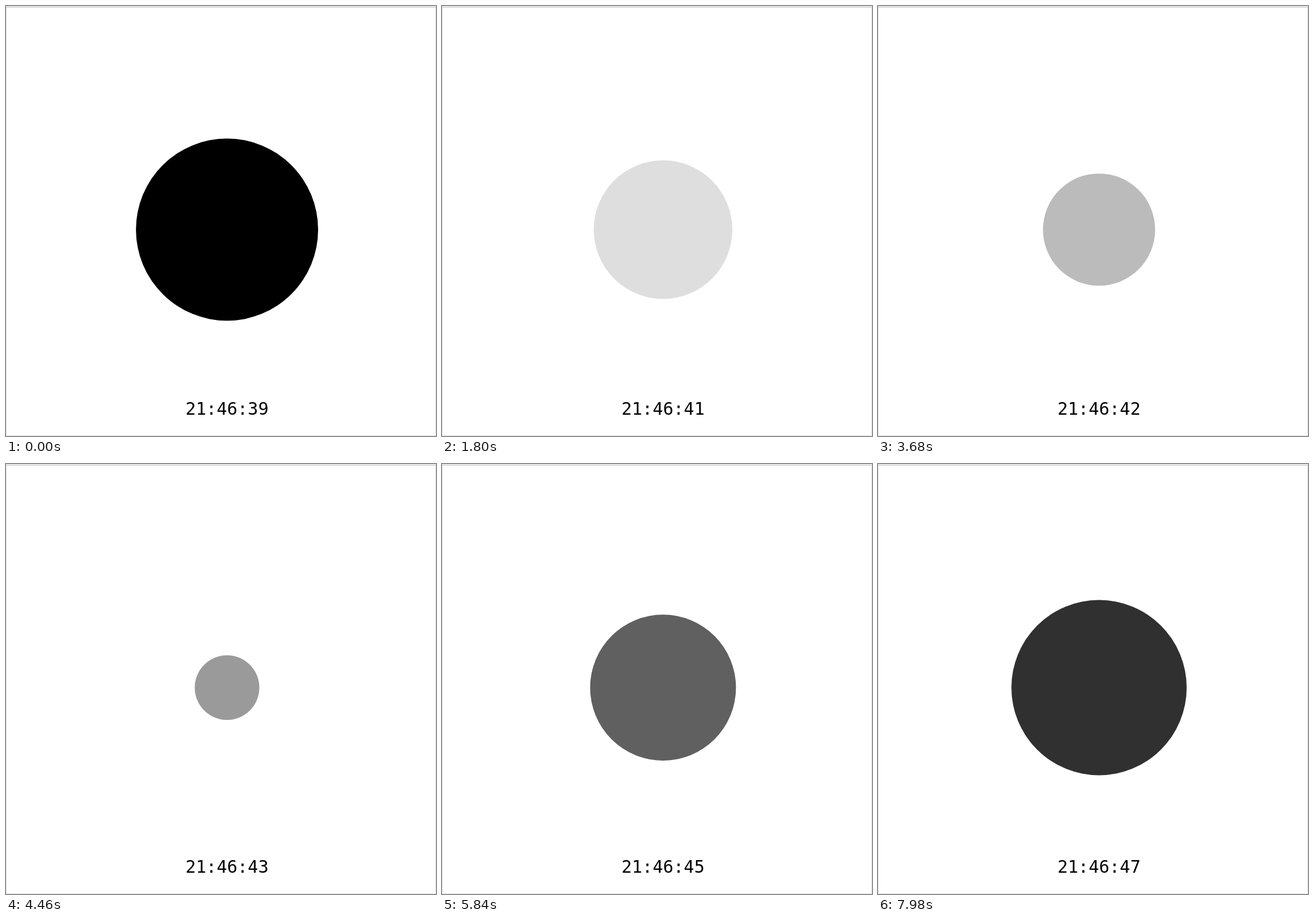
Recreate the animation shown at these times as an HTML page. Size 748x748 px, loop 8 s.

```html
<!DOCTYPE html>
<html lang="en">
<head>
<meta charset="utf-8">
<title>Pulse clock</title>
<style>
  html, body { margin: 0; width: 100%; height: 100%; overflow: hidden; background: #fff; }
  svg { display: block; width: 748px; height: 748px; }
  text { font: 30px "DejaVu Sans Mono", monospace; text-anchor: middle; }
</style>
</head>
<body>
<svg viewBox="0 0 748 748">
  <path d="M.5 2V747.5H747.5V2" fill="none" stroke="#ddd"/>
  <path d="M0 1.75H748" stroke="#c8c8c8" stroke-width="1.5"/>
  <circle id="dot" cx="384.5" cy="389"/>
  <text id="clock" x="384.5" y="710.7"></text>
</svg>
<script>
const LOOP = 8000, STEP = 20;
const PERIOD = 1001.5, RESET = 153, MAX_R = 187;
// Grey of the dot for each second, from :39 on
const GREYS = [0, 255, 222, 187, 154, 124, 96, 71, 48];

const dot = document.getElementById('dot');
const clock = document.getElementById('clock');

function secondAt(t) {
  if (t < 780) return 0;
  return t < 1800 ? 1 : 2 + Math.floor((t - 1800) / 1000);
}

function draw(now) {
  const t = Math.floor((now % LOOP) / STEP) * STEP;
  const phase = ((t - RESET) / PERIOD + 1) % 1;
  const s = secondAt(t), g = GREYS[s];
  dot.setAttribute('r', MAX_R * phase);
  dot.setAttribute('fill', `rgb(${g},${g},${g})`);
  clock.textContent = `21:46:${39 + s}`;
  requestAnimationFrame(draw);
}

draw(0);
</script>
</body>
</html>
```
